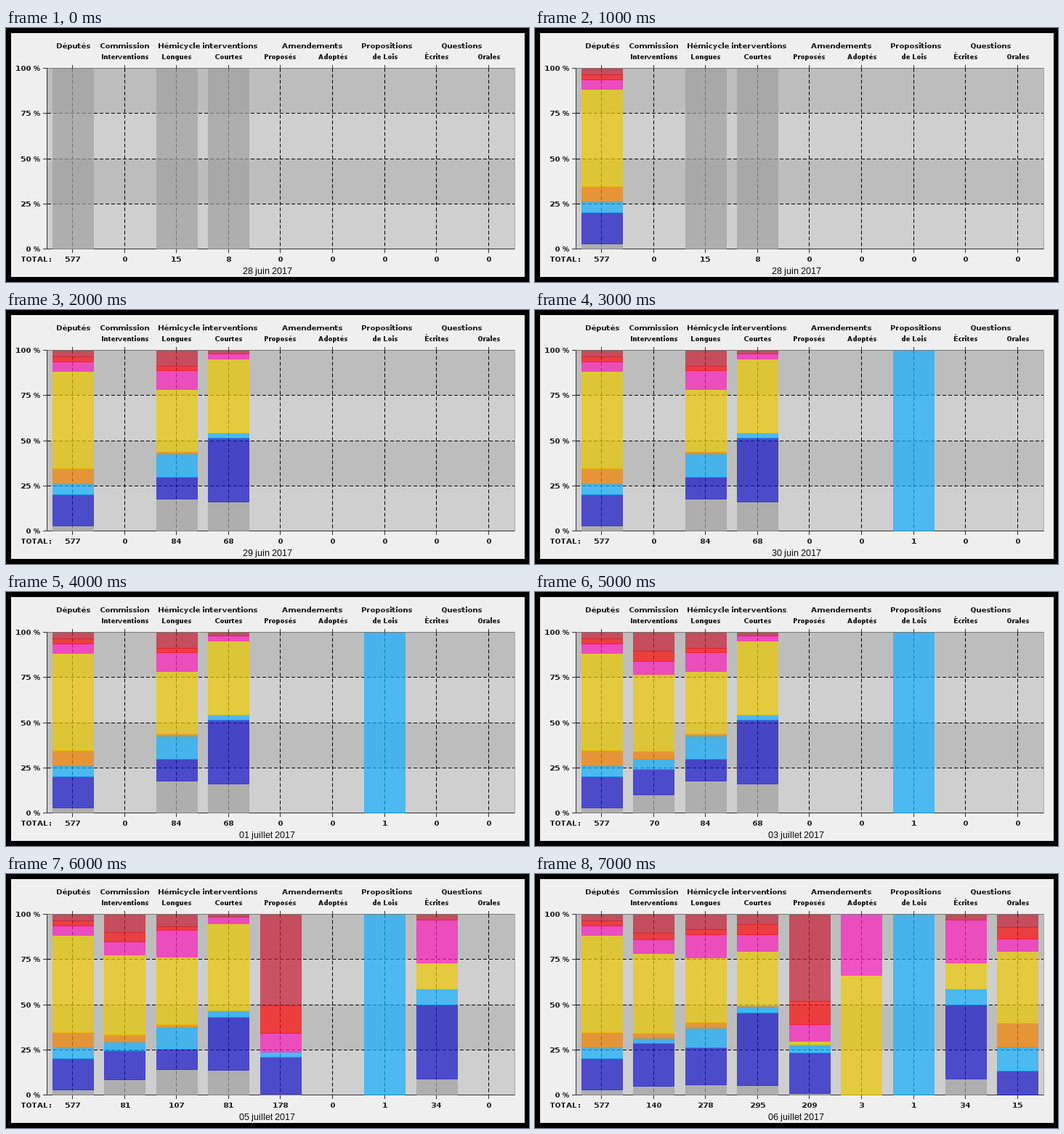
Write a matplotlib script that moves like this. It is 720 by 350 pixels and loops after 8 s.

```python
import matplotlib.pyplot as plt
import numpy as np
from matplotlib.animation import FuncAnimation
from matplotlib.patches import Rectangle

W, H, DPI = 720, 350, 100
PITCH, BAR_W, BAR_H = 71.59, 56, 248
LEFT, RIGHT, TOP, BOTTOM = 56.5, 700.5, 55.5, 304.5
INK, AXIS = "#222222", "#333333"

# Groups in stacking order: grey, blue, cyan, orange, yellow, pink, red, crimson
COLORS = np.array([(160, 160, 160), (20, 20, 200), (20, 176, 255),
                   (247, 133, 0), (236, 201, 0), (255, 30, 190),
                   (255, 10, 10), (201, 30, 53)]) / 255
HEADERS = [("Députés", 92.7), ("Commission", 163.5),
           ("Hémicycle interventions", 277.7), ("Amendements", 420.8),
           ("Propositions", 524.5), ("Questions", 627.5)]
SUBHEADS = ["", "Interventions", "Longues", "Courtes", "Proposés",
            "Adoptés", "de Lois", "Écrites", "Orales"]
(SEATS, HEARINGS, LONG, SHORT, TABLED,
 ADOPTED, BILLS, WRITTEN, ORAL) = range(len(SUBHEADS))

# What each day adds to the count of every group; bars and totals follow.
DAYS = [
    ("28 juin", {SEATS: [577], LONG: [15], SHORT: [8]}),
    ("28 juin", {SEATS: [-560, 100, 35, 47, 313, 31, 16, 18]}),
    ("29 juin", {LONG: [0, 10, 11, 1, 29, 9, 2, 7],
                 SHORT: [3, 24, 2, 0, 28, 2, 0, 1]}),
    ("30 juin", {BILLS: [0, 0, 1]}),
    ("01 juillet", {SEATS: [0, -1, 1]}),
    ("03 juillet", {HEARINGS: [7, 10, 4, 3, 30, 5, 4, 7]}),
    ("05 juillet", {HEARINGS: [0, 3, 0, 0, 6, 1, 0, 1],
                    LONG: [0, 2, 2, 1, 11, 7],
                    SHORT: [0, 0, 1, 0, 11, 1],
                    TABLED: [1, 36, 5, 0, 0, 19, 27, 90],
                    WRITTEN: [3, 14, 3, 0, 5, 8, 0, 1]}),
    ("06 juillet", {HEARINGS: [0, 20, 0, 1, 26, 5, 1, 6],
                    LONG: [1, 45, 17, 7, 60, 20, 6, 15],
                    SHORT: [5, 95, 7, 1, 50, 25, 17, 14],
                    TABLED: [1, 11, 4, 0, 4, 1, 0, 10],
                    ADOPTED: [0, 0, 0, 0, 2, 1],
                    ORAL: [0, 2, 2, 2, 6, 1, 1, 1]}),
]

# Whole-pixel glyph advances
plt.rcParams["text.hinting"] = "native"
plt.rcParams["text.hinting_factor"] = 1

fig = plt.figure(figsize=(W / DPI, H / DPI), dpi=DPI, facecolor="black")
ax = fig.add_axes([0, 0, 1, 1])
ax.set_xlim(0, W)
ax.set_ylim(H, 0)
ax.axis("off")


def px(size):
    return size * 72 / DPI


def mid(v):
    """Centre of the pixel that holds v."""
    return int(v) + .5


def center(column):
    return mid(91.5 + PITCH * column)


def box(x0, y0, x1, y1, color, edge="none", z=1):
    return ax.add_patch(Rectangle((x0, y0), x1 - x0, y1 - y0, facecolor=color,
                                  edgecolor=edge, lw=px(1), zorder=z,
                                  snap=False))


def line(x0, y0, x1, y1, color=AXIS, dashed=False):
    ax.plot([x0, x1], [y0, y1], color="black" if dashed else color, lw=px(1),
            ls=(0, (5, 3)) if dashed else "-", zorder=2, snap=False,
            solid_capstyle="butt", dash_capstyle="butt")


def label(x, y, text, size=10, align="center", font="DejaVu Sans",
          weight="bold", color=INK):
    return ax.text(x, y, text, fontsize=px(size), ha=align, va="baseline",
                   family=font, weight=weight, color=color, zorder=5)


def draw_chart():
    box(7, 7, 714, 343, "#efefef")
    rows = [mid(y) for y in np.linspace(TOP, BOTTOM, 5)]
    for i, y in enumerate(rows):
        if i < 4:
            box(57, int(y), 701, int(rows[i + 1]),
                "#cfcfcf" if i % 2 else "#bdbdbd")
        if 0 < i < 4:
            line(57, y, 701, y, dashed=True)
        line(51, y, 57, y)
        label(47, y + 3.3, f"{100 - 25 * i} %", align="right")
    line(LEFT, TOP, RIGHT, TOP, "#777777")
    line(RIGHT, TOP, RIGHT, BOTTOM, "#a8a8a8")
    line(LEFT, TOP, LEFT, BOTTOM)
    line(LEFT, BOTTOM, RIGHT, BOTTOM)
    for column, text in enumerate(SUBHEADS):
        x = center(column)
        line(x, TOP, x, BOTTOM, dashed=True)
        line(x, 51, x, TOP)
        line(x, BOTTOM, x, 310)
        label(x, 43, text, 9)
    for text, x in HEADERS:
        label(x, 27.8, text)
    label(19.8, 322, "TOTAL", align="left")
    label(62.5, 322, ":", align="right")


def count_until(day):
    counts = np.zeros((len(SUBHEADS), len(COLORS)), int)
    for _, added in DAYS[:day + 1]:
        for column, new in added.items():
            counts[column, :len(new)] += new
    return counts


def draw_bar(column, counts):
    x = mid(64 + PITCH * column)
    tops = BOTTOM - BAR_H * np.cumsum(counts) / counts.sum()
    base = BOTTOM
    for top, n, rgb in zip(tops, counts, COLORS):
        if n:
            top = mid(top)
            box(x, top, x + BAR_W, base, (*rgb, .7), (*rgb, .6), 3)
            base = top


draw_chart()
totals = [label(center(c), 322, "") for c in range(len(SUBHEADS))]
date = label(359.7, 339, "", 12, font="Liberation Sans", weight="normal",
             color="black")


def update(day):
    for patch in list(ax.patches):
        if patch.get_zorder() == 3:
            patch.remove()
    for column, counts in enumerate(count_until(day)):
        totals[column].set_text(str(counts.sum()))
        if counts.any():
            draw_bar(column, counts)
    date.set_text(f"{DAYS[day][0]} 2017")
    return []


anim = FuncAnimation(fig, update, frames=len(DAYS), interval=1000,
                     init_func=lambda: [], repeat=True, repeat_delay=0)
plt.show()
```
